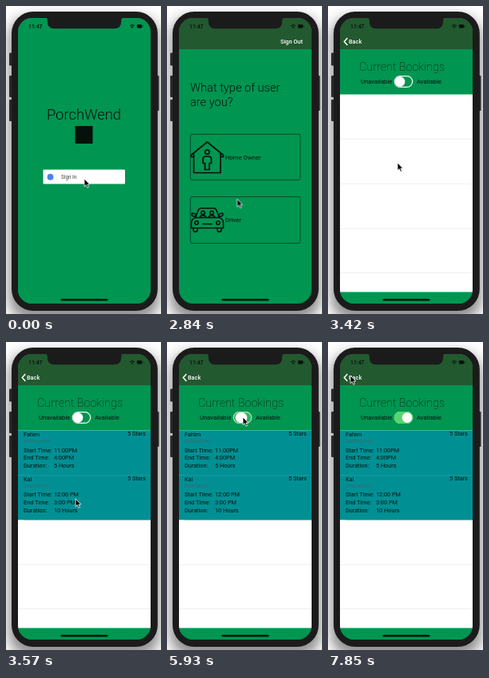
An HTML page that plays this animation: 194x385 px, repeating every 7.99 s.

```html
<!DOCTYPE html>
<html lang="en">
<head>
<meta charset="utf-8">
<title>Driver bookings demo</title>
<style>
html, body { margin: 0; width: 100%; height: 100%; overflow: hidden; background: #fdfdfd; }
svg { display: block; width: 100%; height: 100%; }
text { font: 400 7.3px Roboto, Inter, sans-serif; fill: #06110b; }
.brand { font-size: 18.4px; font-weight: 300; text-anchor: middle; }
.ask { font-size: 14.6px; font-weight: 300; }
.heading { font-size: 14.4px; font-weight: 200; }
.label { font-size: 7.7px; }
.time { font-size: 6.9px; font-weight: 500; }
.nav { font-weight: 500; fill: #fff; }
.button { font-size: 6.3px; font-weight: 500; fill: #666; }
.phone { font-size: 5.8px; fill: #42666a; }
.line { fill: none; stroke: #06110b; stroke-linecap: round; stroke-linejoin: round; }

.anim { animation: 7990ms step-end infinite; }
#signIn { animation-name: signIn; }
#signInButton { animation-name: press; }
#home { animation-name: home; }
#dim { animation-name: dim; }
#bookings { animation-name: bookings; }
#rows { animation-name: rows; }
#signOut { animation-name: signOut; }
#back { animation-name: back; }
#backLabel { animation-name: backLabel; }
#trackOff { animation-name: trackOff; }
#trackOn { animation-name: trackOn; }
#knob { animation-name: knob; }
#cursor { animation-name: cursor; }

@keyframes signIn { 0% { visibility: visible } 16.8%, 100% { visibility: hidden } }
@keyframes press { 0% { fill: #fff } 1.852% { fill: #e6e6e6 } 3.704%, 100% { fill: #fff } }
@keyframes home {
  0% { transform: none }
  38.889% { transform: translateX(-34px) }
  40.741% { transform: translateX(-47px) }
  42.593%, 100% { transform: translateX(-50px) }
}
@keyframes dim { 0% { opacity: 0 } 38.889% { opacity: .07 } 40.741%, 100% { opacity: .1 } }
@keyframes bookings {
  0% { transform: translateX(166px) }
  38.889% { transform: translateX(54px) }
  40.741% { transform: translateX(9px) }
  42.593%, 100% { transform: none }
}
@keyframes rows { 0% { visibility: hidden } 44.444%, 100% { visibility: visible } }
@keyframes signOut { 0% { opacity: 1 } 38.889% { opacity: .4 } 40.741% { opacity: .08 } 42.593%, 100% { opacity: 0 } }
@keyframes back { 0% { opacity: 0 } 38.889% { opacity: .75 } 40.741%, 100% { opacity: 1 } }
@keyframes backLabel {
  0% { transform: translateX(24px) }
  38.889% { transform: translateX(8px) }
  40.741% { transform: translateX(1px) }
  42.593%, 100% { transform: none }
}
@keyframes trackOff {
  0% { fill-opacity: 0 }
  59.259% { fill-opacity: .9 }
  62.963% { fill-opacity: 0 }
  88.889% { fill-opacity: .9 }
  92.593%, 100% { fill-opacity: 0 }
}
@keyframes trackOn {
  0% { opacity: 0 }
  61.111% { opacity: .6 }
  62.963% { opacity: 1 }
  74.074% { opacity: .5 }
  75.926% { opacity: 0 }
  90.741% { opacity: .6 }
  92.593%, 100% { opacity: 1 }
}
@keyframes knob {
  0% { x: 83.5px; width: 13px }
  59.259% { x: 83.5px; width: 16px }
  61.111% { x: 87.5px; width: 15px }
  62.963% { x: 92.5px; width: 13px }
  72.222% { x: 89.5px; width: 16px }
  74.074% { x: 85.5px; width: 15px }
  75.926% { x: 83.5px; width: 13px }
  88.889% { x: 83.5px; width: 16px }
  90.741% { x: 87.5px; width: 15px }
  92.593%, 100% { x: 92.5px; width: 13px }
}
@keyframes cursor {
  0% { transform: translate(98px, 216px) }
  25.926% { transform: translate(98px, 216px); animation-timing-function: steps(3) }
  31.481% { transform: translate(88px, 264px) }
  33.333% { transform: translate(88px, 264px); animation-timing-function: steps(3) }
  38.889% { transform: translate(87px, 196px) }
  48.148% { transform: translate(87px, 196px); animation-timing-function: steps(6) }
  59.259% { transform: translate(95px, 94px) }
  90.741% { transform: translate(95px, 94px); animation-timing-function: steps(4) }
  98.148%, 100% { transform: translate(28px, 42px) }
}
</style>
</head>
<body>
<svg viewBox="0 0 194 385" preserveAspectRatio="none">
  <defs>
    <clipPath id="screen"><rect x="15" y="15" width="166" height="357" rx="17.500"/></clipPath>
    <filter id="blur" x="-25%" y="-25%" width="150%" height="150%"><feGaussianBlur stdDeviation="8"/></filter>
  </defs>

  <rect x="4" y="14" width="188" height="378" rx="26" opacity=".45" filter="url(#blur)"/>
  <g fill="#2a2a2a">
    <rect x="4" y="58.500" width="5" height="16" rx="1"/>
    <rect x="4" y="87" width="5" height="27" rx="1"/>
    <rect x="4" y="117" width="5" height="27" rx="1"/>
    <rect x="187" y="87" width="4.500" height="44" rx="1"/>
  </g>
  <rect x="7" y="7" width="182.800" height="374" rx="27" fill="#1b1b1b"/>

  <g clip-path="url(#screen)">
    <rect x="15" y="15" width="166" height="357" fill="#009551"/>

    <g id="home" class="anim">
      <text class="ask" x="29" y="107">What type of user</text>
      <text class="ask" x="29" y="125">are you?</text>
      <g class="line" stroke-width=".8" opacity=".7">
        <rect x="29.300" y="160.300" width="137.500" height="57" rx="2"/>
        <rect x="29.300" y="238.500" width="137.500" height="58" rx="2"/>
      </g>
      <g class="line" stroke-width="1.700">
        <path d="M30 186.500 50.300 170 70.500 186.500M33.500 185V208.500H67V185M30 186.500V188.500H33.500M70.500 186.500V188.500H67"/>
        <circle cx="50.300" cy="182.500" r="2.700"/>
        <path d="M48.500 188H52Q55.500 188 55.500 191.500V196.500H53V204.500H47.500V196.500H45V191.500Q45 188 48.500 188Z"/>
      </g>
      <g class="line" stroke-width="1.600">
        <path d="M35.500 264.500 39 255.500Q40 252.800 43 252.800H58Q61 252.800 62 255.500L65.500 264.500M36 264.500H65Q70.500 266 70.500 271V277.500H30.500V271Q30.500 266 36 264.500ZM33 277.500V280Q33 282.300 35.500 282.300T38 280V277.500M63 277.500V280Q63 282.300 65.500 282.300T68 280V277.500"/>
        <path d="M36 262.500Q31 263.500 31 260.500T36 260.500M65 262.500Q70 263.500 70 260.500T65 260.500M45 272.500H56"/>
        <circle cx="37" cy="271" r="2.200"/><circle cx="64" cy="271" r="2.200"/>
        <circle cx="45" cy="258.500" r="2.200"/><circle cx="56" cy="258.500" r="2.200"/>
        <path d="M41 264.500Q41.500 261.800 45 261.800T49 264.500M52 264.500Q52.500 261.800 56 261.800T60 264.500"/>
      </g>
      <text class="label" x="73" y="191.500">Home Owner</text>
      <text class="label" x="73" y="270">Driver</text>
    </g>
    <rect id="dim" class="anim" x="15" y="54" width="166" height="318"/>

    <g id="bookings" class="anim">
      <rect x="15" y="54" width="166" height="318" fill="#009551"/>
      <text class="heading" x="39" y="81">Current Bookings</text>
      <text class="label" x="41" y="97">Unavailable</text>
      <text class="label" x="111" y="97">Available</text>
      <rect id="trackOff" class="anim" x="83.300" y="87.600" width="22.400" height="13.800" rx="6.900" fill="#e8f0ea" stroke="#f4f8f5" stroke-width="1.200"/>
      <rect id="trackOn" class="anim" x="82.800" y="87.100" width="23.400" height="14.800" rx="7.400" fill="#53d769"/>
      <rect id="knob" class="anim" x="83.500" y="88" width="13" height="13" rx="6.500" fill="#fff" stroke="#00000030" stroke-width=".4"/>
      <rect x="15" y="110.500" width="166" height="247" fill="#fff"/>
      <path d="M15 166.300H181M15 222.300H181M15 278.300H181M15 333.500H181" stroke="#e6e6e6" stroke-width=".6"/>
      <g id="rows" class="anim"></g>
    </g>

    <rect x="15" y="15" width="166" height="39" fill="#22592f"/>
    <text id="signOut" class="nav anim" x="142" y="47">Sign Out</text>
    <g id="back" class="anim">
      <path d="M24.300 40 20.300 44.500 24.300 49" fill="none" stroke="#fff" stroke-width="1.500"/>
      <text id="backLabel" class="nav anim" x="26" y="47.300">Back</text>
    </g>

    <g id="signIn" class="anim">
      <rect x="15" y="15" width="166" height="357" fill="#009551"/>
      <text class="brand" x="97.500" y="142">PorchWend</text>
      <rect x="86.500" y="150" width="22" height="22" fill="#06110b"/>
      <rect x="46.500" y="206" width="102.500" height="17" rx="1" opacity=".2"/>
      <rect id="signInButton" class="anim" x="46.500" y="204.500" width="102.500" height="18" rx="1" fill="#fff"/>
      <circle cx="55.500" cy="213.700" r="3.900" fill="#4285f4"/>
      <text class="button" x="69" y="216">Sign in</text>
    </g>

    <path d="M48.500 14Q51.800 15 51.800 18V19.500Q51.800 28.300 60.500 28.300H135.500Q144.200 28.300 144.200 19.500V18Q144.200 15 147.500 14Z" fill="#1b1b1b"/>
    <text class="time" x="28" y="28">11:47</text>
    <g class="line" stroke-width="1">
      <path d="M155.300 24.500Q158 22.200 160.700 24.500M156.600 26.200Q158 25 159.400 26.200M158 27.600V27.700"/>
      <rect x="164.300" y="23.600" width="5.600" height="3.600" rx=".6" fill="#06110b" stroke-width=".6"/>
      <path d="M171.300 25V25.800" stroke-width=".6"/>
    </g>
    <rect x="68.500" y="366" width="59" height="2.400" rx="1.200" fill="#06110b"/>
  </g>

  <path id="cursor" class="anim" d="M0 0V9.600L2.200 7.600 3.800 11.200 5.500 10.500 3.900 7H6.900Z" fill="#000" stroke="#fff" stroke-width=".8"/>
</svg>
<script>
const guests = [
  { name: "Fahim", phone: "5550100142", start: "11:00PM", end: "4:00PM", hours: "5 Hours" },
  { name: "Kai", phone: "5550100187", start: "12:00 PM", end: "3:00 PM", hours: "10 Hours" }
];
const label = (x, y, content, style = "") => `<text class="${style}" x="${x}" y="${y}">${content}</text>`;

document.getElementById("rows").innerHTML = guests.map((guest, i) => `
  <g transform="translate(0 ${110.5 + i * 55.8})">
    <rect x="15" width="166" height="56" fill="#009094"/>
    <path d="M22 55.800H181" stroke="#0b8285" stroke-width=".5"/>
    ${label(22, 7.5, guest.name)}
    ${label(152, 6.5, "5 Stars")}
    ${label(22, 15.5, guest.phone, "phone")}
    ${[["Start Time:", guest.start], ["End Time:", guest.end], ["Duration:", guest.hours]]
      .map(([key, value], n) => label(22, 27 + n * 9.7, key) + label(60, 27 + n * 9.7, value)).join("")}
  </g>`).join("");
</script>
</body>
</html>
```
